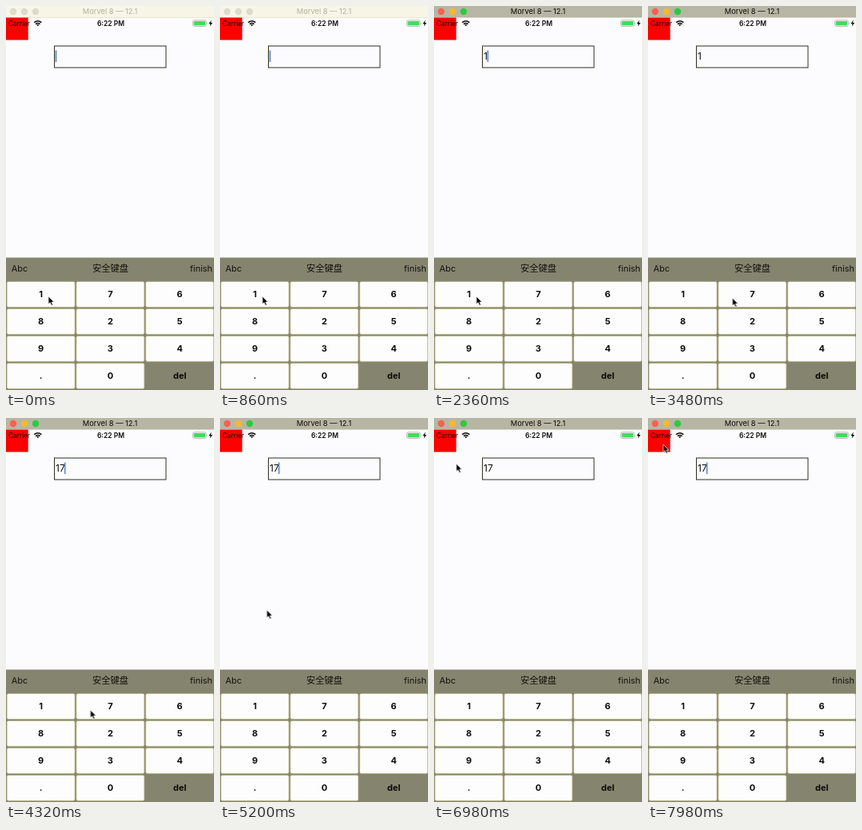
An HTML page that plays this animation: 260 by 480 pixels, repeating every 8 s.

```html
<!DOCTYPE html>
<html lang="en">
<head>
<meta charset="utf-8">
<title>Secure keypad</title>
<style>
  html, body { margin: 0; width: 100%; height: 100%; overflow: hidden; background: #fcfcfe; }
  svg { display: block; width: 260px; height: 480px; }
  text { font-family: Inter, Roboto, "Noto Sans CJK SC", "Noto Sans CJK", sans-serif; fill: #0b0b08; }
  .mid { text-anchor: middle; }
  .title { font-size: 9.3px; }
  .tool { font-size: 10.9px; fill: #14140c; }
  .cjk { font-family: "Noto Sans CJK SC", "Noto Sans CJK", sans-serif; font-size: 11.3px; }
  .key { font-size: 11px; font-weight: 700; }
  .entry { font-size: 12px; }

  .idle, .one, .seven, .blink, .caret { animation: 8s step-end infinite; }
  .idle { animation-name: idle; }
  .one { animation-name: one; }
  .seven { animation-name: seven; }
  .caret { animation-name: shift; }
  .blink { animation-name: blink; }
  .mouse { animation: mouse 8s ease-in-out infinite; }

  @keyframes idle { 0% { opacity: 1; } 16.5%, 100% { opacity: 0; } }
  @keyframes one { 0% { opacity: 0; } 21%, 100% { opacity: 1; } }
  @keyframes seven { 0% { opacity: 0; } 50.5%, 100% { opacity: 1; } }
  @keyframes shift {
    0% { transform: translateX(0); }
    21% { transform: translateX(4.7px); }
    50.5%, 100% { transform: translateX(11.3px); }
  }
  @keyframes blink {
    0%, 7.5%, 21%, 34.75%, 48.4%, 50.5%, 64.25%, 78%, 91.75%, 100% { opacity: 1; }
    2.5%, 16.25%, 30%, 43.1%, 59.25%, 73%, 86.75% { opacity: 0; }
  }
  @keyframes mouse {
    0%, 34% { transform: translate(53px, 363px); }
    42%, 56% { transform: translate(105.5px, 365px); }
    65%, 67% { transform: translate(58.5px, 240px); }
    76%, 79% { transform: translate(44.5px, 102.5px); }
    93%, 100% { transform: translate(19px, 33px); }
  }
</style>
</head>
<body>
<svg viewBox="0 0 260 480" xmlns="http://www.w3.org/2000/svg">
  <rect width="260" height="480" fill="#fcfcfe"/>

  <!-- Window bar, active then idle overlay -->
  <rect width="260" height="14.5" fill="#b7b6a4"/>
  <circle cx="9" cy="7" r="4.2" fill="#fb5f50"/>
  <circle cx="23" cy="7" r="4.2" fill="#f9b82e"/>
  <circle cx="37" cy="7" r="4.2" fill="#2fc840"/>
  <text class="title mid" x="130" y="10.4">Morvel 8 — 12.1</text>
  <g class="idle">
    <rect width="260" height="14.5" fill="#f7f6e6"/>
    <g fill="#dcdbcb">
      <circle cx="9" cy="7" r="4.2"/>
      <circle cx="23" cy="7" r="4.2"/>
      <circle cx="37" cy="7" r="4.2"/>
    </g>
    <text class="title mid" x="130" y="10.4" style="fill:#b5b09c">Morvel 8 — 12.1</text>
  </g>

  <!-- Status bar -->
  <rect y="14.5" width="27.7" height="28" fill="#fd0000"/>
  <text x="3" y="24.8" font-size="8.3">Carrier</text>
  <g fill="none" stroke="#0b0b08" stroke-width="1.5">
    <path d="M35.2 20.6Q39.8 16.8 44.4 20.6"/>
    <path d="M37 22.6Q39.8 20.4 42.6 22.6"/>
  </g>
  <path d="M38.2 23.6Q39.8 22.6 41.4 23.6L39.8 25.3Z" fill="#0b0b08"/>
  <text class="mid" x="131" y="24.8" font-size="8.5" font-weight="600">6:22 PM</text>
  <rect x="233.6" y="17.8" width="16.6" height="7.6" rx="1.8" fill="#fcfcfe" stroke="#86a886" stroke-width=".7"/>
  <rect x="234.7" y="18.9" width="14.4" height="5.4" rx="1" fill="#45d860"/>
  <path d="M251.2 20.2q1.2 1.4 0 2.8z" fill="#86a886"/>
  <path d="M256.8 17.6L253.4 22.2H255.5L254.8 25.6L258.2 20.9H256.1Z" fill="#0b0b08"/>

  <!-- Entry field -->
  <rect x="60.5" y="50" width="139.5" height="27" fill="#fcfcfe" stroke="#2e2e24"/>
  <text class="entry one" x="62" y="67.3">1</text>
  <text class="entry seven" x="67" y="67.3">7</text>
  <g class="caret"><rect class="blink" x="61.7" y="55.5" width="1.5" height="14.5" fill="#4a72c4"/></g>

  <!-- Keypad -->
  <rect y="314.5" width="260" height="165.5" fill="#85846f"/>
  <text class="tool" x="6.8" y="332.2">Abc</text>
  <text class="tool cjk mid" x="130.5" y="332.4" lang="zh-CN">安全键盘</text>
  <text class="tool" x="258" y="332.2" text-anchor="end">finish</text>
  <g id="keys"></g>

  <path class="mouse" d="M0 0V9.6L2.2 7.7L3.8 11.3L5.5 10.5L4 7.1H7Z" fill="#050505" stroke="#fcfcfe" stroke-width=".7"/>
</svg>
<script>
  const labels = ["1", "7", "6", "8", "2", "5", "9", "3", "4", ".", "0", "del"];
  document.getElementById("keys").innerHTML = labels.map((label, i) => {
    const x = 1.1 + (i % 3) * 86.8;
    const y = 344.4 + Math.floor(i / 3) * 34;
    const cap = label === "del" ? "" :
      `<rect x="${x}" y="${y}" width="85" height="32" rx="2" fill="#fdfdfe" stroke="#b4b274" stroke-width=".7"/>`;
    return `${cap}<text class="key mid" x="${x + 42.5}" y="${y + 19.6}">${label}</text>`;
  }).join("");
</script>
</body>
</html>
```
